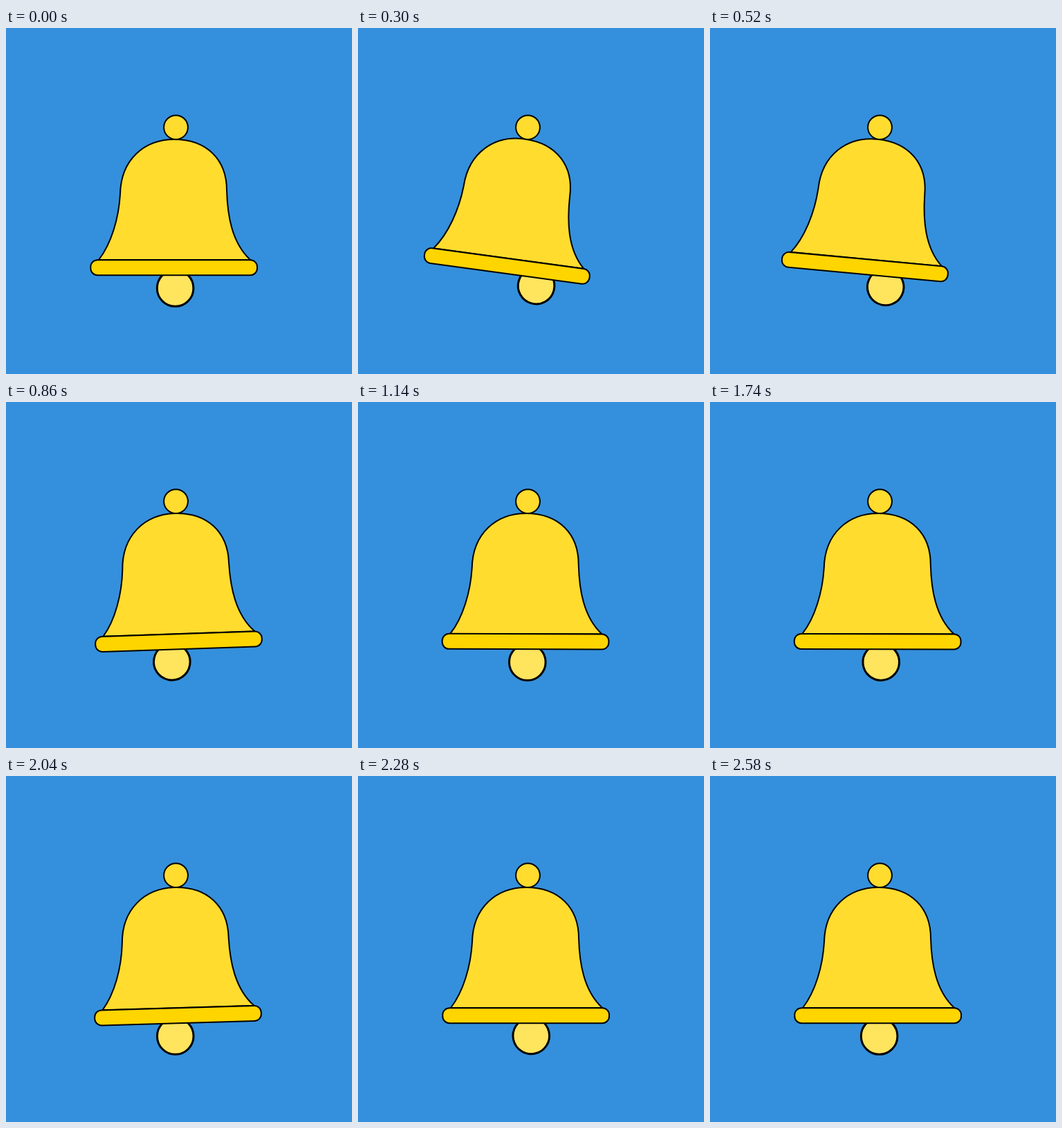
These frames come from a looping animation (500x500 px, 2.68 s). An HTML page:

```html
<!DOCTYPE html>
<html lang="en">
<head>
<meta charset="utf-8">
<title>Ringing bell</title>
<style>
  html, body { margin: 0; height: 100%; overflow: hidden; background: #3490dc; }
  svg { display: block; width: 100%; height: 100%; }
</style>
</head>
<body>
<svg viewBox="0 0 500 500" stroke="#000" stroke-width="2">
  <circle id="clapper" cx="244.6" cy="376" r="26.3" fill="#ffe45e" stroke-width="3"/>
  <g id="bell">
    <path fill="#ffdc2e" d="M134 335C152 312 163 275 165 240C166 190 200 161 243 161C290 161 319 190 319 235C320 270 326 310 353 335Z"/>
    <rect x="122.3" y="335.2" width="240.7" height="22" rx="10" fill="#ffd500"/>
  </g>
  <circle cx="245.5" cy="143.6" r="17.4" fill="#ffdc2e"/>
</svg>
<script>
  const LOOP = 2680;
  const times = [170, 466, 774, 1058, 1348, 1655, 1960, 2262, 2570];
  const swings = [
    { id: 'bell', pivot: '245.5 143.6', angles: [0, 10.5, -10.5, 5.8, -5.8, 3, -3, 0, 0] },
    { id: 'clapper', pivot: '244.6 349.7', angles: [0, -40, 40, -16, 16, -20, 10, -13, 0] }
  ];
  for (const swing of swings) swing.node = document.getElementById(swing.id);

  const bezier = (a, b, s) => 3 * a * s * (1 - s) ** 2 + 3 * b * s * s * (1 - s) + s ** 3;

  // cubic-bezier(.25, .1, .25, 1), solved by bisection
  function ease(u) {
    let low = 0, high = 1;
    for (let i = 0; i < 20; i++) {
      const mid = (low + high) / 2;
      if (bezier(.25, .25, mid) < u) low = mid; else high = mid;
    }
    return bezier(.1, 1, low);
  }

  function angleAt(angles, t) {
    if (t <= times[0] || t >= times.at(-1)) return 0;
    const next = times.findIndex(time => time > t), i = next - 1;
    const u = (t - times[i]) / (times[next] - times[i]);
    return angles[i] + (angles[next] - angles[i]) * ease(u);
  }

  function draw() {
    const t = performance.now() % LOOP;
    for (const { node, pivot, angles } of swings)
      node.setAttribute('transform', `rotate(${angleAt(angles, t)} ${pivot})`);
    requestAnimationFrame(draw);
  }
  draw();
</script>
</body>
</html>
```
